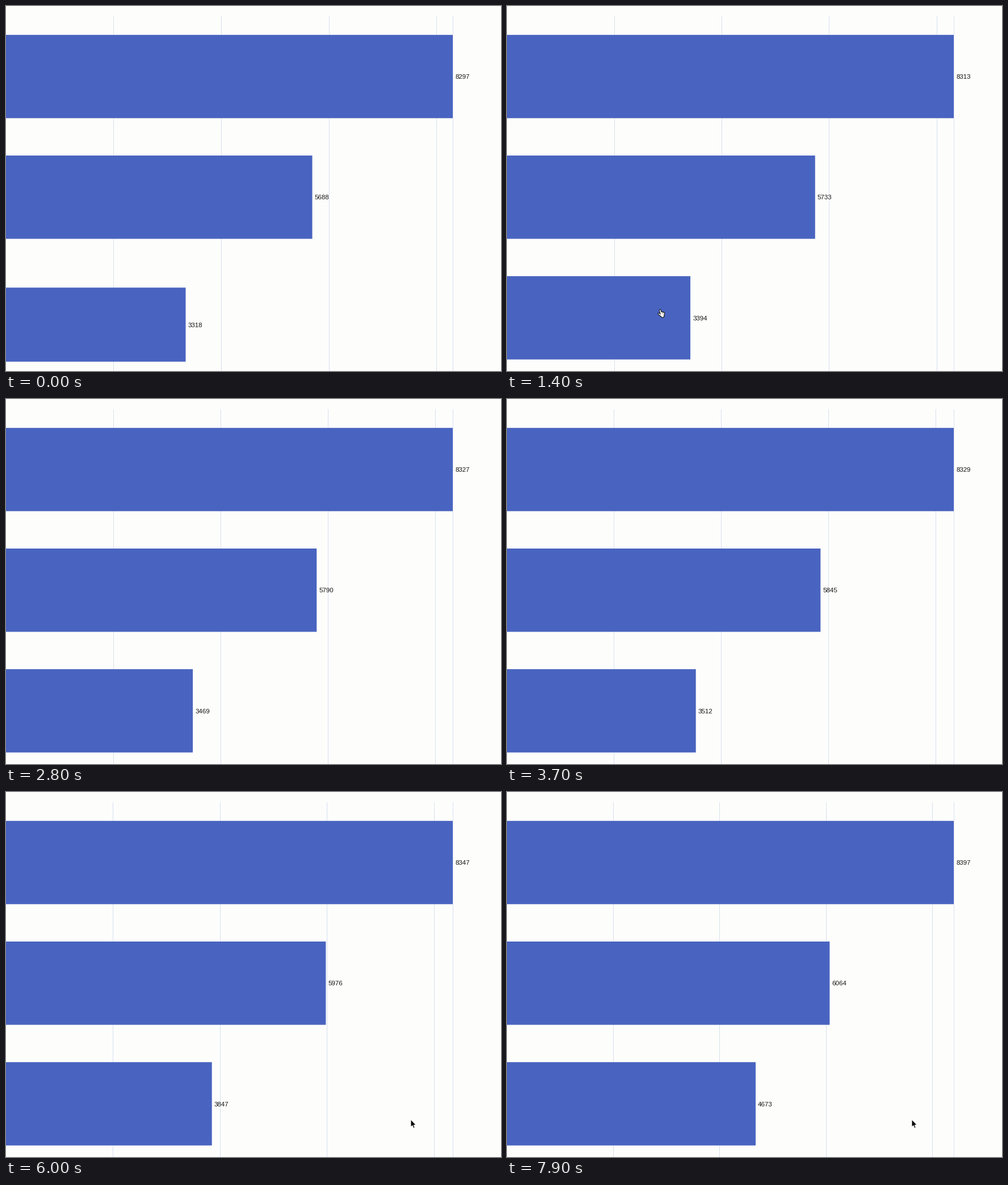
Animation of 872 by 642 pixels, one loop 8000 ms. Source, as a matplotlib script:

```python
import numpy as np
import matplotlib.pyplot as plt
from matplotlib.animation import FuncAnimation
from matplotlib.patches import Polygon, Rectangle

W, H, DPI = 872, 642, 100
FRAMES, STEP = 80, 100
PX = 72 / DPI
BLUE, GRID, INK, PAPER = "#4964c0", "#d7e0ee", "#161616", "#fdfdfc"
FULL, TOP, BAR_H, PITCH = 787, 50.8, 146.5, 212.2

# Each bar grows at a steady rate between these moments (seconds).
KNOTS = [0, 2.4, 5.42, 7.9]
GROWTH = [
    [8297.0, 8326.1, 8332.9, 8397.1],
    [5688.0, 5766.5, 5949.0, 6064.5],
    [3318.0, 3449.9, 3595.0, 4673.5],
]

plt.rcParams["font.family"] = "Liberation Sans"
fig = plt.figure(figsize=(W / DPI, H / DPI), dpi=DPI, facecolor=PAPER)
ax = fig.add_axes([0, 0, 1, 1])
ax.set_xlim(0, W)
ax.set_ylim(H, 0)
ax.axis("off")


def box(x, y, w, h, color, z):
    return ax.add_patch(Rectangle((x, y), w, h, fc=color, lw=0, zorder=z, snap=False))


def make_hand(x, y):
    """Pointing hand: round strokes in black, then thinner ones in white."""
    strokes = [((3.6, 2.2), (5.8, 10), 1.8), ((1.4, 8.2), (4.6, 11.2), 1.6),
               ((7, 11), (8, 12.2), 4.6)]
    strokes += [((6.6 + 2 * k, 5.6 + 0.6 * k), (7 + 1.4 * k, 10.5), 1.5)
                for k in range(3)]
    parts = []
    for color, extra, z in (("black", 2, 6), ("white", 0, 7)):
        for (x0, y0), (x1, y1), width in strokes:
            parts += ax.plot([x + x0, x + x1], [y + y0, y + y1], color=color,
                             lw=(width + extra) * PX, solid_capstyle="round", zorder=z)
    return parts


grid = [box(0, 18, 1, H - 18, GRID, 1) for _ in range(4)]
box(FULL, 18, 1, H - 18, GRID, 1)
bars = [box(0, TOP, 1, BAR_H, BLUE, 2) for _ in GROWTH]
labels = [ax.text(0, 0, "", size=11.5 * PX, color=INK, va="baseline", zorder=4)
          for _ in GROWTH]

hand = make_hand(266, 533)
ARROW = np.array([(0, 0), (0, 13.4), (3, 10.7), (5, 15.4), (7.2, 14.5),
                  (5.3, 10), (9.3, 9.7)])
arrow = ax.add_patch(Polygon(ARROW, fc="black", ec="white", lw=PX,
                             joinstyle="round", zorder=6, snap=False))


def entry(t):
    """Share of the third bar's entrance still to go (cubic ease out)."""
    u = min((t + 0.6) / 0.86, 1)
    return 4 * (1 - u) ** 3


def draw(frame):
    t = frame * STEP / 1000
    values = [np.interp(t, KNOTS, row) for row in GROWTH]
    scale = FULL / values[0]

    for i, line in enumerate(grid):
        line.set_x(np.floor(2000 * (i + 1) * scale))

    for i, (bar, label, value) in enumerate(zip(bars, labels, values)):
        end, y, h = value * scale, TOP + i * PITCH, BAR_H
        if i == 2:
            left = entry(t)
            end += 1.8 * max(0, 1 - (t / 5) ** 2)
            y += 182 * left
            h *= 1 - left
        bar.set_bounds(0, y, end, h)
        label.set_position((end + 4.2, y + h / 2 + 4.2))
        label.set_text(str(int(value)))

    for part in hand:
        part.set_visible(1.0 <= t < 1.9)

    arrow.set_visible(t >= 4.4)
    moments = [4.4, 5.0, 5.8]
    tip = (np.interp(t, moments, [620, 674, 713]),
           np.interp(t, moments, [617, 513, 576]))
    arrow.set_xy(ARROW + tip)
    return [*grid, *bars, *labels, *hand, arrow]


anim = FuncAnimation(fig, draw, frames=FRAMES, interval=STEP, repeat=True,
                     repeat_delay=0, blit=False)
plt.show()
```
